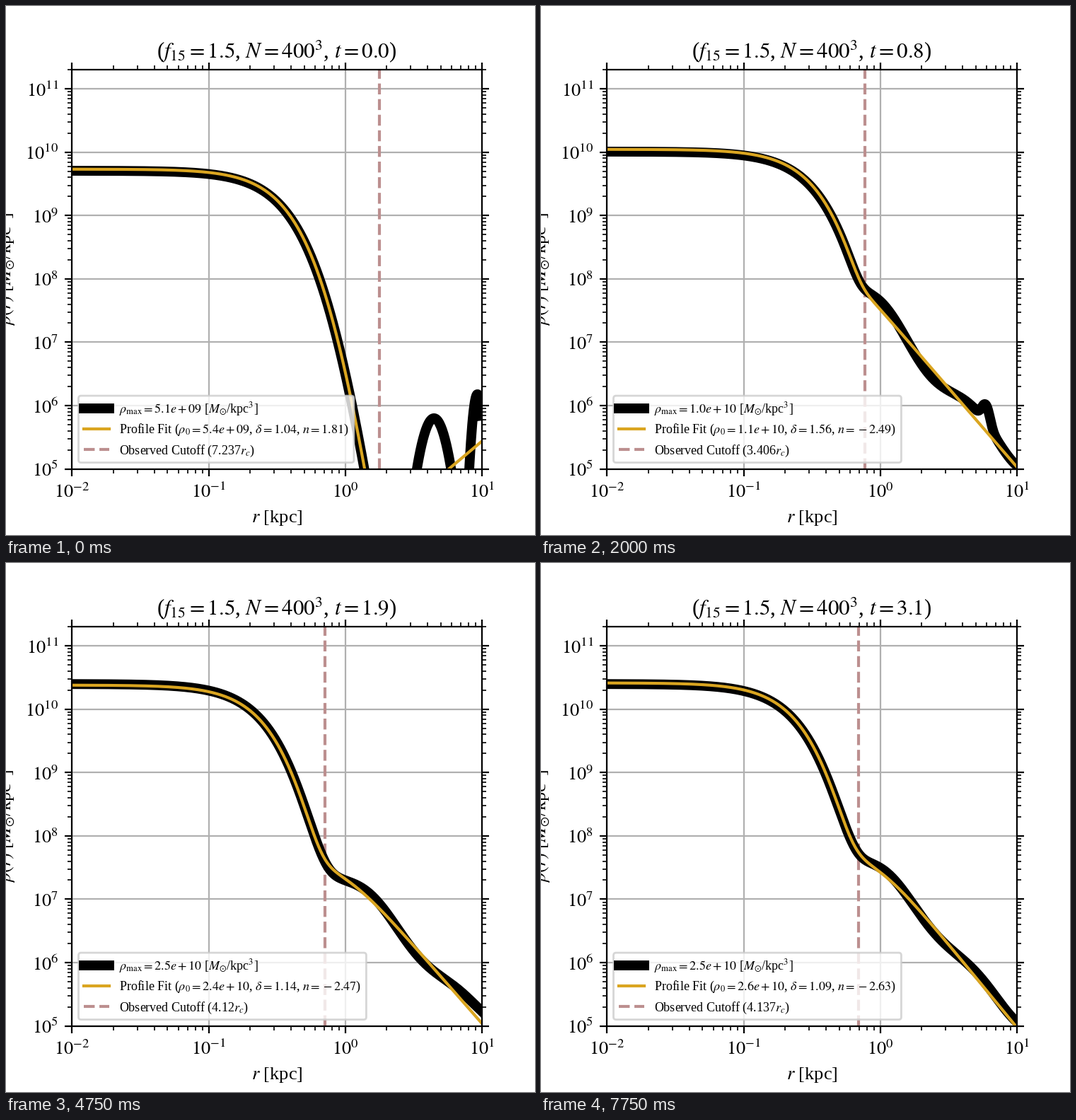
Animation, 748 px wide and 748 px high, one loop 8000 ms. Source, as a matplotlib script:

```python
import numpy as np
import matplotlib.pyplot as plt
from matplotlib.animation import FuncAnimation
from matplotlib.patches import FancyBboxPatch
from matplotlib.ticker import FuncFormatter, LogLocator, NullFormatter

SIZE, DPI = 748, 200
FRAMES, INTERVAL = 32, 250

plt.rcParams.update({
    "font.family": "Liberation Serif",
    "mathtext.fontset": "stix",
    "font.size": 9.5,
    "xtick.top": True,
    "ytick.right": True,
})

# Quoted fit results at a few times; everything else follows from them
TIMES = [0, 0.5, 1.0, 1.4, 1.9, 2.3, 3.1]
QUOTED = {
    "rho_max": np.log10([5.1e9, 1.2e10, 9.2e9, 3.0e10, 2.5e10, 2.4e10, 2.5e10]),
    "rho0": np.log10([5.4e9, 1.3e10, 1.0e10, 3.2e10, 2.4e10, 2.5e10, 2.6e10]),
    "delta": [1.04, 0.902, 2.0, 0.954, 1.14, 1.05, 1.09],
    "n": [1.81, -2.2, -2.69, -2.75, -2.47, -2.48, -2.63],
    "ratio": [7.237, 3.745, 3.18, 4.019, 4.12, 4.037, 4.137],
}

U = np.linspace(-2, 1, 601)
R = 10 ** U


def params(t):
    p = {name: np.interp(t, TIMES, row) for name, row in QUOTED.items()}
    p["rc"] = (1.88e7 * p["delta"] / 10 ** p["rho0"]) ** 0.25
    p["cut"] = p["ratio"] * p["rc"]
    return p


def core(p):
    """Soliton with unit central density."""
    return (1 + 0.091 * (R / p["rc"]) ** 2) ** -8


def tail(t, p):
    """Power law, damped inside the cutoff; the knee softens with time."""
    early = 1 / (1 + (t / 1.15) ** 12)
    turn = p["cut"] * (1.17 - 0.17 * early)
    edge = min(5.436, 5.15 + 0.4 * (p["n"] + 2.2))
    return 10 ** (edge + p["n"] * (U - 1)) / (1 + (turn / R) ** (3 + 5 * early))


def shell(height, centre, width):
    return 10 ** (height - ((U - centre) / width) ** 2)


def fit_curve(t, p):
    return 10 ** p["rho0"] * core(p) + tail(t, p)


def data_curve(t, p):
    """Core and growing halo, two infalling shells and a standing wave."""
    grow = min(1, 2 * t)
    rho = 10 ** p["rho_max"] * core(p) + grow ** 2 * tail(t, p)
    rho += shell(5.8 - 3 * t, 0.65 - 0.25 * t, 0.14)
    rho += shell(6.18 - 1.5 * t ** 4, 0.968 - 0.246 * t, 0.055)

    crest = 0.1 - 0.1 * np.cos(2 * np.pi * (t - 1) / 1.8)
    amp = 0.08 + 0.3 * np.exp(-2 * t)
    wave = amp * np.cos(2 * np.pi * (U - crest) / 0.68)
    wave /= 1 + np.exp(-(U + 0.15) / 0.04)
    rise = 0.15 * np.clip(U, 0, 1) ** 8
    return rho * 10 ** (grow * (wave + rise))


def signif(x, digits):
    return str(float(f"{x:.{digits}g}"))


def signed(x):
    text = signif(x, 3)
    if text[0] == "-":
        return r"\hspace{0.2}{-}\hspace{0.2}" + text[1:]
    return text


fig = plt.figure(figsize=(SIZE / DPI, SIZE / DPI), dpi=DPI, facecolor="white")
ax = fig.add_axes([0.1249, 0.1249, 0.7745, 0.7545])
ax.set(xscale="log", yscale="log", xlim=(1e-2, 1e1), ylim=(1e5, 2e11))
for axis in (ax.xaxis, ax.yaxis):
    axis.set_major_locator(LogLocator(numticks=15))
    axis.set_minor_locator(LogLocator(subs=np.arange(2, 10), numticks=15))
    axis.set_major_formatter(
        FuncFormatter(lambda v, _: f"$10^{{{round(np.log10(v))}}}$"))
    axis.set_minor_formatter(NullFormatter())
ax.grid(True)
ax.set_xlabel(r"$r$ [kpc]")
ax.set_ylabel(r"$\rho(r)$ [$M_{\odot}$/kpc$^3$]")
title = ax.set_title("", fontsize=11.1, y=1.0, pad=6)

STYLES = [
    dict(color="black", lw=5),
    dict(color="goldenrod", lw=1.5),
    dict(color="rosybrown", lw=1.5, ls="--"),
]
cut_line = ax.axvline(1, **STYLES[2])
data_line, = ax.plot([], [], **STYLES[0])
fit_line, = ax.plot([], [], **STYLES[1])

# Legend, laid out in pixels on top of the plot
TEXT_X = 160.4
top = fig.add_axes([0, 0, 1, 1])
top.set(xlim=(0, SIZE), ylim=(SIZE, 0))
top.axis("off")
box = FancyBboxPatch((102.5, 551.1), 389, 94.5,
                     boxstyle="round,pad=0,rounding_size=3.6",
                     fc="white", ec="0.8", lw=1, alpha=0.8)
top.add_patch(box)
labels = []
for row, style in enumerate(STYLES):
    y = 568.7 + 29.35 * row
    top.plot([109.7, 145.8], [y, y], **style)
    labels.append(top.text(TEXT_X, y + 6.3, "", fontsize=6.5, va="baseline"))


def draw(i):
    t = i / 10
    p = params(t)
    data_line.set_data(R, data_curve(t, p))
    fit_line.set_data(R, fit_curve(t, p))
    cut_line.set_xdata([p["cut"]] * 2)
    title.set_text(f"($f_{{15}}=1.5$, $N=400^3$, $t={t:.1f}$)")

    labels[0].set_text(rf"$\rho_{{\mathrm{{max}}}}={10 ** p['rho_max']:.1e}$"
                       r" [$M_{\odot}$/kpc$^3$]")
    labels[1].set_text(rf"Profile Fit ($\rho_0={10 ** p['rho0']:.1e}$, "
                       rf"$\delta={signif(p['delta'], 3)}$, "
                       rf"$n={signed(p['n'])}$)")
    labels[2].set_text(f"Observed Cutoff ({signif(p['ratio'], 4)}$r_c$)")
    renderer = fig.canvas.get_renderer()
    width = max(text.get_window_extent(renderer).width for text in labels)
    scale = SIZE / fig.bbox.width
    box.set_width(TEXT_X + width * scale + 7.2 - box.get_x())
    return cut_line, data_line, fit_line, title, box, *labels


anim = FuncAnimation(fig, draw, frames=FRAMES, interval=INTERVAL,
                     init_func=lambda: draw(0), repeat=True, repeat_delay=0,
                     blit=False)
plt.show()
```
